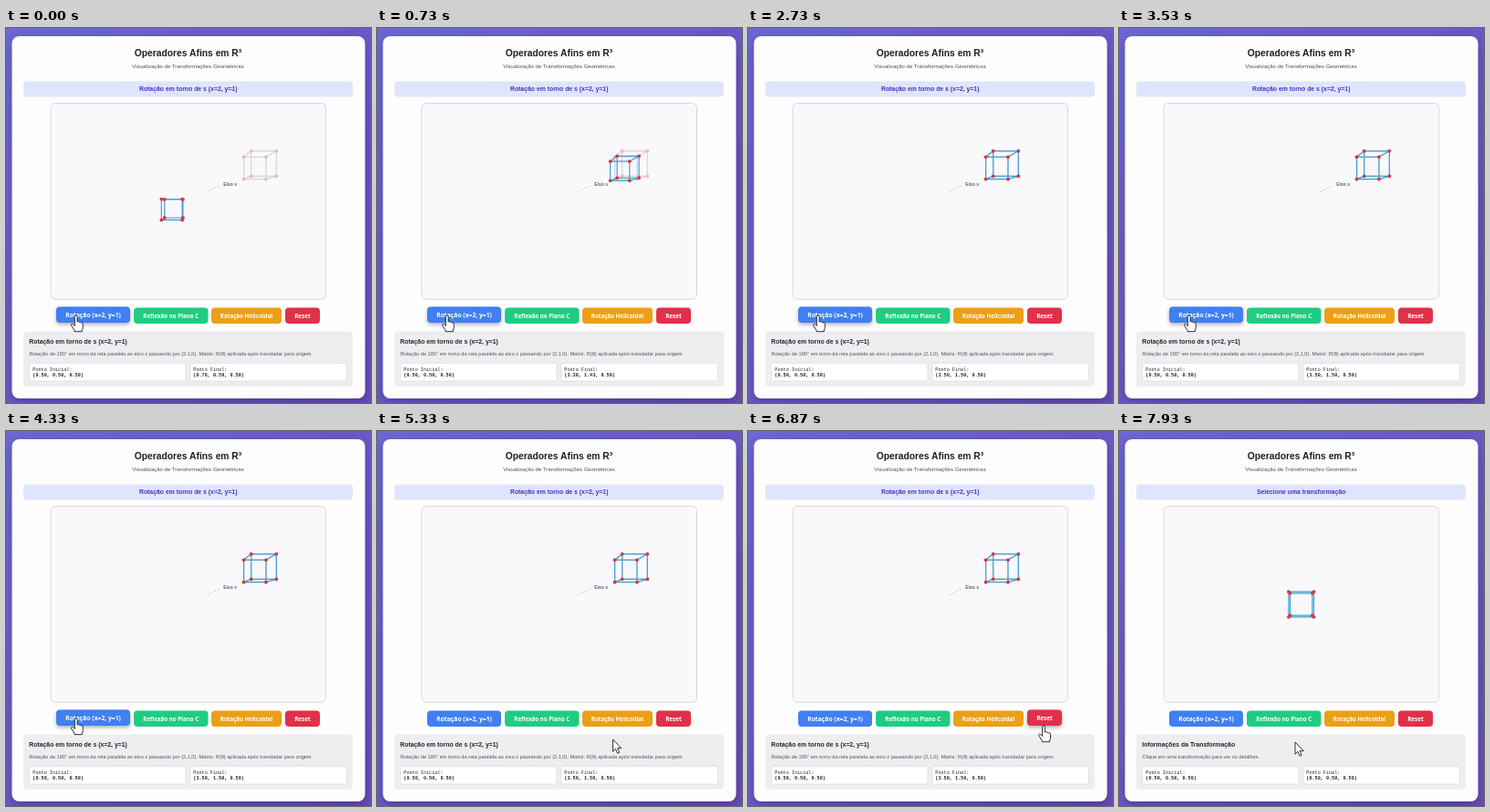
Recreate the animation shown at these times as an HTML page. Size 400 px wide and 411 px high, loop 8 s.

```html
<!DOCTYPE html>
<html lang="pt">
<head>
<meta charset="utf-8">
<style>
html, body { margin: 0; width: 100%; height: 100%; overflow: hidden; }
body { background: linear-gradient(135deg, #6c68d4, #694db4); }
svg { display: block; width: 100%; height: 100%; font-family: "Liberation Sans", Arial, sans-serif; }
#card { filter: drop-shadow(0 4px 6px rgba(30, 15, 80, .35)); }
.bold { font-weight: 700; }
.mid { text-anchor: middle; }
.button text { font-family: "Open Sans", "Noto Sans", sans-serif; font-weight: 700; fill: #fff; }
.button.hover { transform: translateY(-.9px); filter: drop-shadow(0 2px 2px rgba(0, 0, 0, .3)); }
.mono { font: 5.15px "Liberation Mono", "DejaVu Sans Mono", monospace; fill: #222; }
.mono .bold { font-weight: 700; }
</style>
</head>
<body>
<svg viewBox="0 0 400 411">
  <rect id="card" x="6.5" y="9" width="387" height="397" rx="8" fill="#fefdfe"/>
  <text class="bold mid" x="199.5" y="31" font-size="10.3" fill="#1f1f2b">Operadores Afins em R³</text>
  <text class="mid" x="199.5" y="44" font-size="6" fill="#4c4c55">Visualização de Transformações Geométricas</text>

  <rect x="19" y="58.5" width="361" height="17" rx="4" fill="#e0e5fe"/>
  <text id="banner" class="bold mid" x="199.7" y="69.3" font-size="6.87" fill="#4434c6"/>

  <rect x="49" y="82.5" width="301.5" height="214.8" rx="5" fill="#f9f8fb" stroke="#d9d8df"/>
  <g id="axis">
    <path id="axisLine" stroke="#bcbac2" stroke-width=".8" stroke-dasharray="2.2 2"/>
    <text class="bold" x="238.3" y="172.8" font-size="5" fill="#62626c">Eixo s</text>
  </g>
  <g id="ghost" stroke="#938c99" fill="#dc3545" opacity=".33"/>
  <g id="cube" stroke="#3d9fd0" fill="#dc3545"/>

  <g id="buttons"></g>

  <rect x="19" y="332.5" width="361" height="60.5" rx="4" fill="#eeedf0"/>
  <text id="heading" class="bold" x="25.3" y="345.7" font-size="6.87" fill="#25252d"/>
  <text id="detail" x="25.4" y="358.5" font-size="5.6" fill="#55555d"/>
  <g fill="#fff" stroke="#dddce1" stroke-width=".8">
    <rect x="25.5" y="367.3" width="171.5" height="19.7" rx="2"/>
    <rect x="202" y="367.3" width="171.5" height="19.7" rx="2"/>
  </g>
  <g class="mono">
    <text x="29.3" y="376">Ponto Inicial:</text>
    <text x="29.3" y="382" class="bold">(0.50, 0.50, 0.50)</text>
    <text x="205.3" y="376">Ponto Final:</text>
    <text id="finalPoint" x="205.3" y="382" class="bold"/>
  </g>

  <path id="cursor" fill="#fff" stroke="#1a1a1a" stroke-width=".9" stroke-linejoin="round"/>
</svg>
<script>
const LOOP = 8000, RESET_AT = 7100;
const MOVE_MS = 1200, MOVE_START = .208;   // the move is already under way at time 0
const ROTATION = 'Rotação em torno de s (x=2, y=1)';
const HAND = 'M-1.4 11V1.4a1.4 1.4 0 0 1 2.8 0V7q1.3-1 2.3.6q1.3-.8 2.1.5q1.6-.5 1.8 1.2v4q0 1.5-1 2.7v1.7H-1.6v-1.3L-5 11.3q-.8-1.6.7-2q1.3.1 2.9 2.2z';
const ARROW = 'M0 0V13.2l3-2.8 2 4.8 2.1-.9-2-4.7H9.3z';
const BUTTONS = [
  { x: 55, w: 81, color: '#4080f0', size: 6.75, label: 'Rotação (x=2, y=1)' },
  { x: 140, w: 81.5, color: '#20cc82', size: 6.2, label: 'Reflexão no Plano C' },
  { x: 225, w: 77, color: '#ec9f17', size: 6.2, label: 'Rotação Helicoidal' },
  { x: 306, w: 38, color: '#e03149', size: 6.4, label: 'Reset' }
];
// Pointer path: start, end, destination
const START = [76.7, 315];
const MOVES = [
  [4450, 5250, [258.5, 338]],
  [5700, 6600, [324, 323]],
  [7200, 7850, [193, 341]]
];

const $ = id => document.getElementById(id);
const lerp = (a, b, k) => a + (b - a) * k;
const clamp = k => Math.min(1, Math.max(0, k));
const easeInOut = k => k < .5 ? 2 * k * k : 1 - 2 * (1 - k) ** 2;

function add(parent, tag, attrs) {
  const node = document.createElementNS('http://www.w3.org/2000/svg', tag);
  for (const name in attrs) node.setAttribute(name, attrs[name]);
  return parent.appendChild(node);
}

function project(x, y, z) {
  const scale = 207 / (8 - z);
  return [199.7 + x * scale, 190 - y * scale];
}

function makeCube(group) {
  const edges = add(group, 'path', { fill: 'none', 'stroke-width': 1.2 });
  const dots = Array.from({ length: 8 }, () => add(group, 'circle', { r: 1.9, stroke: 'none' }));
  return (cx, cy, size) => {
    const half = bit => bit ? .5 : -.5;
    const points = dots.map((_, i) =>
      project(cx + size * half(i & 1), cy + size * half(i & 2), half(i & 4)));
    let d = '';
    points.forEach((p, i) => {
      dots[i].setAttribute('cx', p[0]);
      dots[i].setAttribute('cy', p[1]);
      for (const bit of [1, 2, 4]) if (!(i & bit)) d += `M${p}L${points[i | bit]}`;
    });
    edges.setAttribute('d', d);
  };
}

const drawCube = makeCube($('cube'));
makeCube($('ghost'))(3, 1.5, -1);
$('axisLine').setAttribute('d', `M${project(1, .5, -2)}L${project(1, .5, 2)}`);

for (const b of BUTTONS) {
  b.node = add($('buttons'), 'g', { class: 'button' });
  add(b.node, 'rect', { x: b.x, y: 306.5, width: b.w, height: 17.5, rx: 4, fill: b.color });
  add(b.node, 'text', { x: b.x + b.w / 2, y: 317.6, 'font-size': b.size, class: 'mid' }).textContent = b.label;
}

function drawPointer(t) {
  let [x, y] = START;
  for (const [from, to, end] of MOVES) {
    const k = easeInOut(clamp((t - from) / (to - from)));
    x = lerp(x, end[0], k);
    y = lerp(y, end[1], k);
  }
  let overButton = false;
  for (const b of BUTTONS) {
    const hover = x > b.x && x < b.x + b.w && y > 306 && y < 324;
    b.node.classList.toggle('hover', hover);
    overButton ||= hover;
  }
  $('cursor').setAttribute('d', overButton ? HAND : ARROW);
  $('cursor').setAttribute('transform', `translate(${x} ${y})`);
}

function render(t) {
  const idle = t >= RESET_AT;
  const k = idle ? 0 : easeInOut(clamp(MOVE_START + t / MOVE_MS));
  // Each vertex moves straight to its place after the half turn, so the cube passes through zero width.
  if (idle) drawCube(0, 0, 1);
  else drawCube(lerp(-1, 3, k), lerp(-.5, 1.5, k), 1 - 2 * k);
  for (const id of ['axis', 'ghost']) $(id).style.display = idle ? 'none' : '';

  $('banner').textContent = idle ? 'Selecione uma transformação' : ROTATION;
  $('heading').textContent = idle ? 'Informações da Transformação' : ROTATION;
  $('detail').textContent = idle
    ? 'Clique em uma transformação para ver os detalhes.'
    : 'Rotação de 180° em torno da reta paralela ao eixo z passando por (2,1,0). Matriz: R(θ) aplicada após transladar para origem.';
  $('finalPoint').textContent = `(${lerp(.5, 3.5, k).toFixed(2)}, ${lerp(.5, 1.5, k).toFixed(2)}, 0.50)`;
  drawPointer(t);
}

const begin = performance.now();
function tick() {
  render((performance.now() - begin) % LOOP);
  requestAnimationFrame(tick);
}
tick();
</script>
</body>
</html>
```
